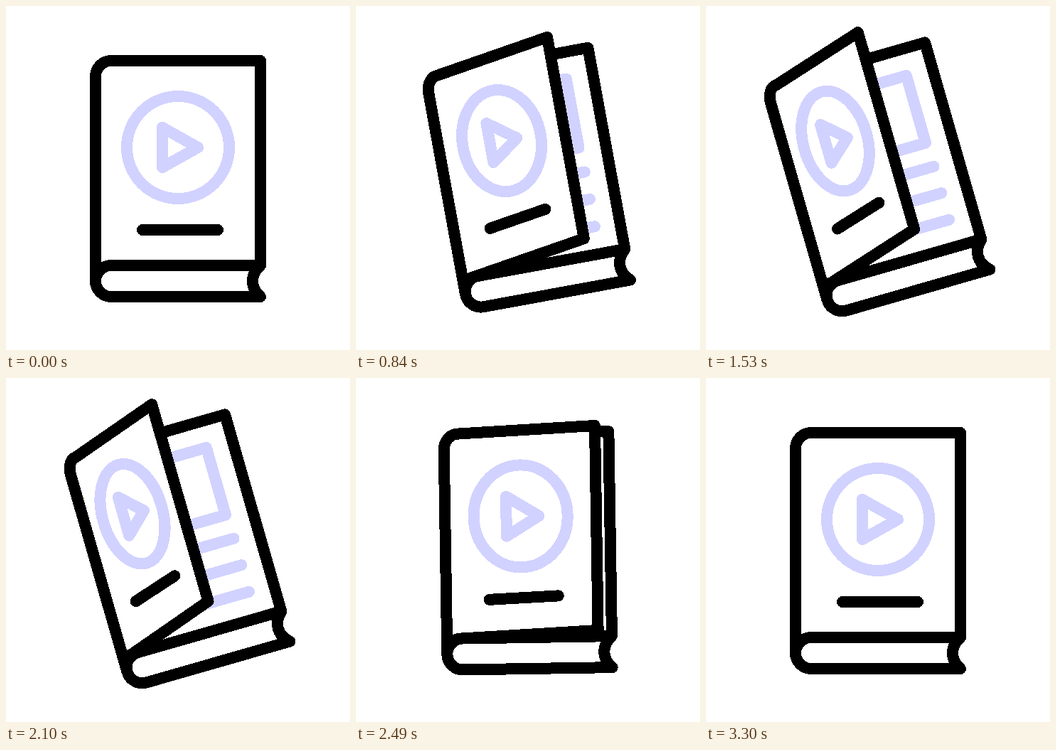
An HTML page that plays this animation: 484x484 px, repeating every 3.6 s.

```html
<!DOCTYPE html>
<html lang="en">
<head>
<meta charset="utf-8">
<title>Opening book</title>
<style>
  html, body { margin: 0; width: 100%; height: 100%; overflow: hidden; background: #fff; }
  svg { display: block; width: 100vw; height: 100vh; }
  svg * {
    fill: none; stroke: #000; stroke-width: 16;
    stroke-linecap: round; stroke-linejoin: round;
    shape-rendering: crispEdges;
  }
  .lilac, .lilac * { stroke: #d1d2ff; }
  #cover { fill: #fff; }
</style>
</head>
<body>
<svg viewBox="0 0 484 484">
  <g id="book">
    <path d="M148 77H358V365"/>
    <path class="lilac" d="M164 114.5H320V213H164ZM164 248H322M164 287H322M164 326H322"/>
    <path id="cover"/>
    <g class="lilac">
      <ellipse id="ring" ry="72"/>
      <path id="play"/>
    </g>
    <path id="title"/>
    <path d="M358 365H148A22 22 0 0 0 148 409H358C351 403 347 395 347 387C347 379 351 371 358 365"/>
  </g>
</svg>
<script>
  const LOOP = 3600, STEP = 30;
  const SPINE = 126, WIDTH = 232;

  const smooth = u => u * u * (3 - 2 * u);
  const settle = u => u + u * u - u * u * u;

  // swing: book angle; fold: width lost by the cover; rise: lift of its free edge; lift: 0..1 for the cover art
  const keys = [
    { t: 300,  swing: 0,   fold: 0,  rise: 0,    lift: 0 },
    { t: 1200, swing: -16, fold: 83, rise: 38.6, lift: 1 },
    { t: 2100, swing: -16, fold: 95, rise: 42,   lift: 1 },
    { t: 2700, swing: 5,   fold: 0,  rise: 0,    lift: 0, ease: settle },
    { t: 3300, swing: 0,   fold: 0,  rise: 0,    lift: 0 }
  ];

  const el = id => document.getElementById(id);
  const [book, cover, ring, play, title] = ['book', 'cover', 'ring', 'play', 'title'].map(el);

  function poseAt(time) {
    if (time <= keys[0].t) return keys[0];
    const i = keys.findIndex(k => time < k.t);
    if (i < 0) return keys[keys.length - 1];
    const a = keys[i - 1], b = keys[i];
    const u = (time - a.t) / (b.t - a.t);
    const mix = (name, ease) => a[name] + (b[name] - a[name]) * ease(u);
    const ease = b.ease || smooth;
    return {
      swing: mix('swing', smooth),
      fold: mix('fold', ease),
      rise: mix('rise', ease),
      lift: mix('lift', ease)
    };
  }

  function draw({ swing, fold, rise, lift }) {
    const s = 1 - fold / WIDTH;
    const X = x => SPINE + s * (x - SPINE);
    const cy = 199 - 23.5 * lift;

    book.setAttribute('transform', `rotate(${swing} 242 242)`);
    cover.setAttribute('d',
      `M126 387V99C126 87 ${X(136)} 77 ${X(148)} 77` +
      `L${X(358)} ${77 - rise}V${365 - rise}` +
      `L${X(148)} 365C${X(136)} 365 126 375 126 387Z`);
    ring.setAttribute('cx', X(242));
    ring.setAttribute('cy', cy);
    ring.setAttribute('rx', 72 * s);
    play.setAttribute('d', `M${X(220)} ${cy - 28}V${cy + 28}L${X(270)} ${cy}Z`);
    title.setAttribute('d', `M${X(192)} ${315 - 20 * lift}L${X(298)} ${315 - 39.3 * lift}`);
  }

  const start = performance.now();
  function tick() {
    const time = Math.max(0, performance.now() - start) % LOOP;
    draw(poseAt(Math.floor(time / STEP) * STEP));
    requestAnimationFrame(tick);
  }
  tick();
</script>
</body>
</html>
```
